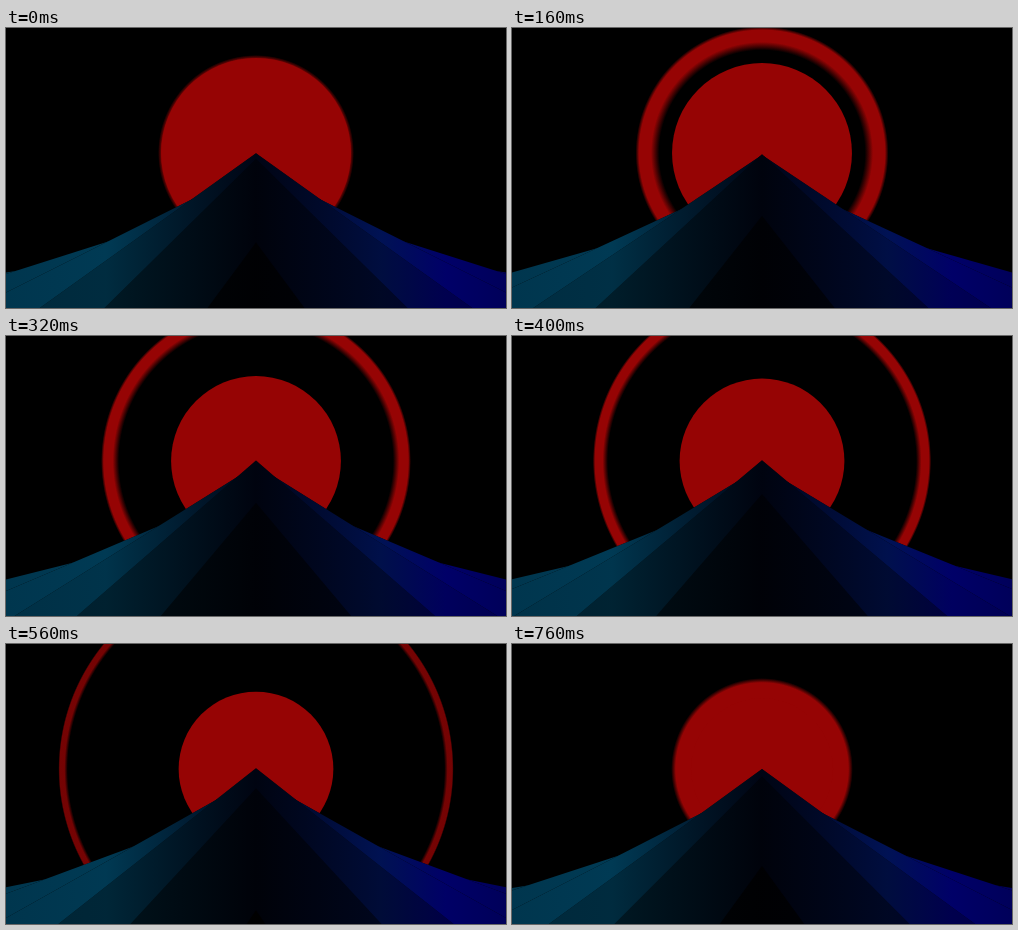
Write an HTML page with a canvas that moves like this. It is 500 px wide and 280 px high and loops after 0.8 s.

```html
<!DOCTYPE html>
<html lang="en">
<head>
<meta charset="utf-8">
<title>Mountain sunrise loop</title>
<style>
  html, body { margin: 0; width: 100%; height: 100%; overflow: hidden; background: #000; }
  canvas { display: block; width: 500px; height: 280px; }
</style>
</head>
<body>
<canvas id="stage" width="500" height="280"></canvas>
<script>
const ctx = document.getElementById("stage").getContext("2d");
const W = 500, H = 280, CX = W / 2, SUN_Y = 125;
const LOOP = 800, STEP = 40, HALF_REFRESH = 8;
const RIDGE_LIFE = 4777;

const clamp01 = v => Math.min(1, Math.max(0, v));
const red = alpha => `rgba(150, 4, 4, ${alpha})`;

// Teal on the left, near black in the middle, blue on the right.
const tint = ctx.createLinearGradient(0, 0, W, 0);
tint.addColorStop(0, "#00364e");
tint.addColorStop(0.2, "#003a54");
tint.addColorStop(0.5, "#00061a");
tint.addColorStop(0.75, "#001254");
tint.addColorStop(0.88, "#000068");
tint.addColorStop(1, "#00005a");

function drawDisc(radius, fill) {
  ctx.fillStyle = fill;
  ctx.beginPath();
  ctx.arc(CX, SUN_Y, radius, 0, Math.PI * 2);
  ctx.fill();
}

// The hole grows faster than the rim, so the ring thins out as it spreads.
function drawRing(age) {
  const rim = 98 + 0.178 * age;
  const hole = Math.max(0, 68.5 + 0.214 * age);
  const alpha = clamp01((700 - age) / 180);
  if (rim <= hole || alpha === 0) return;
  const glow = ctx.createRadialGradient(CX, SUN_Y, hole, CX, SUN_Y, rim);
  glow.addColorStop(0, red(0));
  glow.addColorStop(0.35, red(alpha));
  glow.addColorStop(0.85, red(alpha));
  glow.addColorStop(1, red(0));
  drawDisc(rim, glow);
}

// Each slope turns steadily until flat; its distance from the base centre rises and falls.
function drawRidge(age) {
  const angle = 53.5 * (1 - age / RIDGE_LIFE) * Math.PI / 180;
  const emerging = Math.max(0, 1 - age / 1050);
  const distance = 128 - 55 * ((age - 2000) / 2000) ** 2 - 34 * emerging ** 2;
  if (distance <= 0 || angle <= 0) return;

  const half = distance / Math.sin(angle);
  ctx.beginPath();
  ctx.moveTo(CX, H - distance / Math.cos(angle));
  ctx.lineTo(CX + half, H);
  ctx.lineTo(CX - half, H);
  ctx.fillStyle = "#000";
  ctx.fill();
  ctx.globalAlpha = clamp01((age + 300) / 2500);
  ctx.fillStyle = tint;
  ctx.fill();
  ctx.globalAlpha = 1;
}

function draw(t) {
  ctx.fillStyle = "#000";
  ctx.fillRect(0, 0, W, H);
  drawRing(t);
  drawRing(t - LOOP);
  drawDisc(95 - 0.0315 * t, red(1));
  for (let n = 5; n >= -1; n--) drawRidge(t + n * LOOP);
}

const start = performance.now();
function tick() {
  const elapsed = performance.now() - start + HALF_REFRESH;
  draw(Math.floor(elapsed / STEP) * STEP % LOOP);
  requestAnimationFrame(tick);
}
tick();
</script>
</body>
</html>
```
